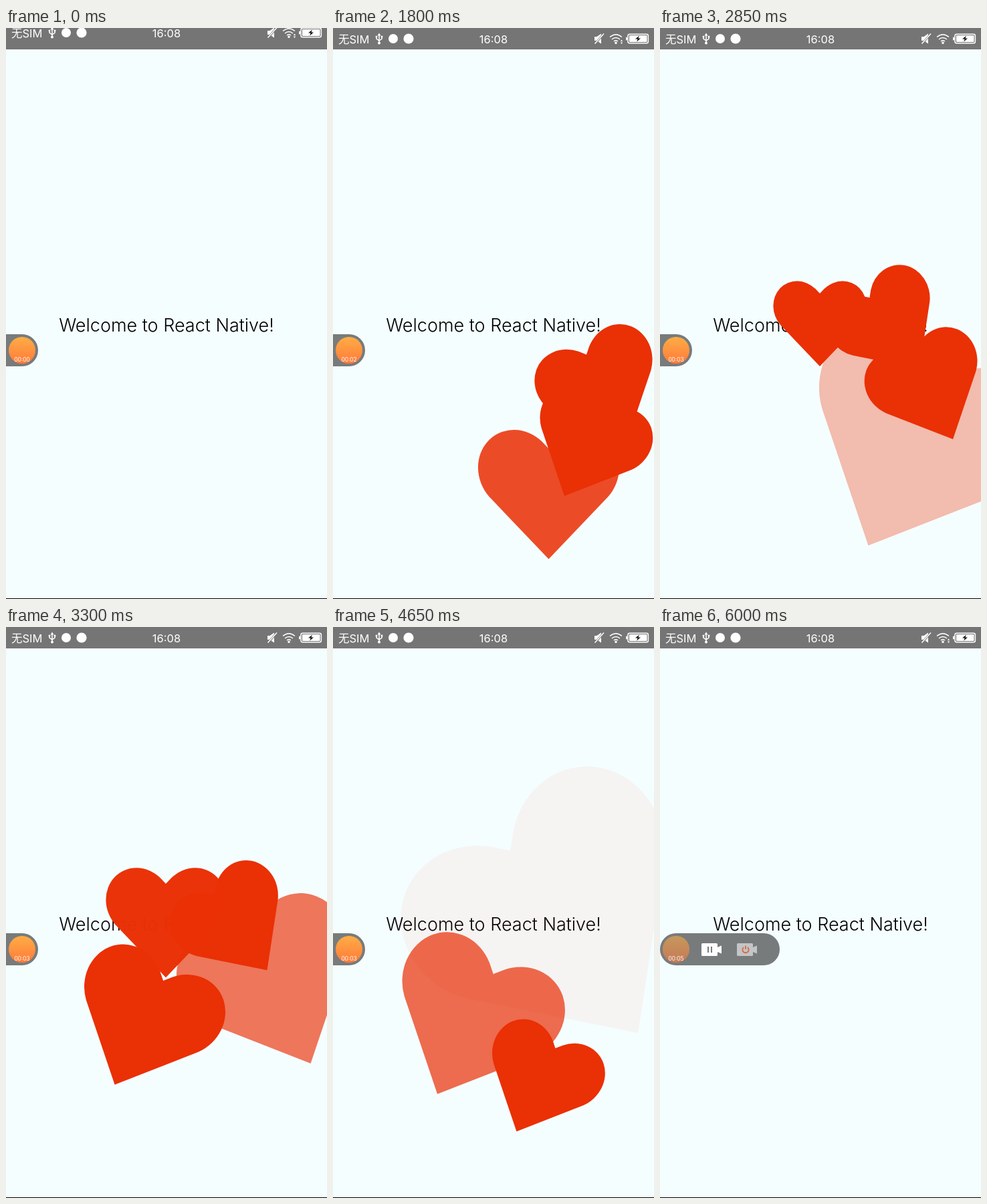
Animation of 480 by 854 pixels, one loop 6150 ms. Source, as an HTML page:

```html
<!DOCTYPE html>
<html lang="en">
<head>
<meta charset="utf-8">
<title>Hearts</title>
<style>
  html, body { margin: 0; width: 100%; height: 100%; overflow: hidden; background: #f5feff; }
  svg { display: block; width: 480px; height: 854px; }
  text { font-family: Inter, "Noto Sans CJK SC", "Noto Sans CJK", sans-serif; }
  .title { font-size: 27px; font-weight: 320; text-anchor: middle; }
  .bar text { font-size: 16.5px; fill: #fff; }
  .clock { font-size: 8.3px; fill: #fff; text-anchor: middle; }
  .line { fill: none; stroke: #fff; stroke-width: 1.5; }
</style>
</head>
<body>
<svg viewBox="0 0 480 854">
  <defs>
    <path id="heart" d="M0 91.8L-88.4 3.3A55.5 60 -45 0 1 -10 -75.1L0 -65.1L10 -75.1A55.5 60 45 0 1 88.4 3.3Z"/>
    <path id="camera" d="M1.5 0H22.5Q24 0 24 1.5V6L30 3.5V15.5L24 13V17.5Q24 19 22.5 19H1.5Q0 19 0 17.5V1.5Q0 0 1.5 0Z"/>
    <linearGradient id="orange" x2="0" y2="1">
      <stop stop-color="#ffad45"/>
      <stop offset="1" stop-color="#ff7a3a"/>
    </linearGradient>
  </defs>

  <rect width="480" height="854" fill="#f5feff"/>
  <text class="title" x="240" y="454">Welcome to React Native!</text>
  <g id="hearts" fill="#ea3005"></g>

  <rect width="480" height="32" fill="#757575"/>
  <g class="bar" id="bar" fill="#fff">
    <text x="8" y="22.5">无SIM</text>
    <text x="240" y="22.5" text-anchor="middle">16:08</text>
    <path class="line" d="M69 10V22M65 13V16L69 19L73 16V13"/>
    <path d="M66.5 11.5L69 7.5L71.5 11.5Z"/>
    <circle cx="69" cy="22.5" r="2"/>
    <circle cx="65" cy="13" r="1.5"/>
    <rect x="71.7" y="11.7" width="2.6" height="2.6"/>
    <circle cx="90" cy="16" r="7"/>
    <circle cx="113" cy="16" r="7.6"/>
    <path d="M391 13H394.5L401 8.5V23.5L394.5 19H391Z"/>
    <path d="M391 24.5L405 8.5" stroke="#757575" stroke-width="3"/>
    <path class="line" d="M391.5 23.5L405 8.5"/>
    <path class="line" d="M414 13.5Q423 6 432 13.5M417 17Q423 12 429 17M420 20Q423 17.5 426 20"/>
    <circle cx="423" cy="22.3" r="1.7"/>
    <path id="wifi" d="M429.8 20L431.5 17.5L433.2 20ZM429.8 21.5H433.2L431.5 24Z"/>
    <rect class="line" x="441" y="9.2" width="30.4" height="13.6" rx="2.5"/>
    <rect x="443" y="11" width="26.5" height="10" rx="1"/>
    <rect x="438" y="13.5" width="2" height="5" rx="1"/>
    <path d="M458 11.5L452 16.6H455.5L454.2 20.5L460 15.4H456.5Z" fill="#111"/>
  </g>

  <path id="panel" fill="#777b7c"/>
  <g id="tools">
    <use href="#camera" x="62" y="473" fill="#fff"/>
    <path d="M72 478V487M77 478V487" stroke="#777b7c" stroke-width="2"/>
    <use id="off" href="#camera" x="115" y="473"/>
    <path d="M125 479.2A4.6 4.6 0 1 0 131 479.2M128 476.8V482" fill="none" stroke="#d9653c" stroke-width="1.7"/>
  </g>
  <circle cx="24" cy="482" r="20" fill="url(#orange)"/>
  <circle id="dim" cx="24" cy="482" r="20" fill="#777b7c"/>
  <text class="clock" id="clock" x="24" y="498.5"></text>
  <rect y="853" width="480" height="1" fill="#000"/>
</svg>

<script>
const LOOP = 6150, STEP = 150, HALF = 400, FADE = 1000;
const $ = id => document.getElementById(id);
const clamp = x => Math.min(1, Math.max(0, x));

// x, y, tilt, born, fade start, removed
const hearts = [
  [322.5, 697.6, 0, 500, 1570, 2570],
  [379.9, 627.2, 25, 1147, 2235, 3235],
  [404.1, 542.3, -25, 1190, 2900, 3900],
  [344.4, 447.5, -35, 2111, 3775, 4775],
  [239, 442.2, 0, 2647, 3240, 3450],
  [205, 593.5, 25, 2900, 4285, 5285],
  [308.4, 681.7, 25, 3490, 5000, 4950]
].map(([x, y, tilt, born, fade, gone]) => {
  const el = document.createElementNS("http://www.w3.org/2000/svg", "use");
  el.setAttribute("href", "#heart");
  $("hearts").append(el);
  return { el, x, y, tilt, born, fade, gone };
});

// Underdamped spring from 0 to 1 with a 25 % overshoot
function spring(ms) {
  if (ms > 950) return 1;
  const n = ms / HALF, a = Math.PI * n;
  return 1 - Math.pow(4, -n) * (Math.cos(a) + 0.441 * Math.sin(a));
}

function easeInOut(x) {
  const half = u => Math.pow(2 * u, 1.68) / 2;
  return x < 0.5 ? half(x) : 1 - half(1 - x);
}

function drawHeart(h, t) {
  const on = t > h.born && t < h.gone;
  h.el.style.display = on ? "" : "none";
  if (!on) return;
  const out = easeInOut(clamp((t - h.fade) / FADE));
  const k = 0.875 * spring(t - h.born) * (1 + 1.5 * out);
  h.el.setAttribute("transform",
    `translate(${h.x} ${h.y}) rotate(${h.tilt}) scale(${k * 0.955} ${k})`);
  h.el.setAttribute("opacity", 1 - out);
}

function drawPanel(t) {
  const open = clamp((t - 5400) / 300), press = clamp((t - 5700) / 300);
  const w = 48 + 131 * open;
  const left = open ? "H24A24 24 0 0 1 24 458Z" : "H0V458Z";
  $("panel").setAttribute("d", `M24 458H${w - 24}A24 24 0 0 1 ${w - 24} 506${left}`);
  $("tools").style.display = open === 1 ? "" : "none";
  $("off").setAttribute("fill", press ? "#c3c5c6" : "#fff");
  $("dim").setAttribute("opacity", 0.42 * press);
  const sec = [750, 1650, 2850, 4800, 5700].filter(s => t >= s).length;
  $("clock").textContent = "00:0" + sec;
}

// The picture advances in fixed steps
function frame(now) {
  const t = Math.floor((now % LOOP) / STEP) * STEP;
  hearts.forEach(h => drawHeart(h, t));
  drawPanel(t);
  $("bar").setAttribute("transform", `translate(0 ${t < STEP ? -9 : 0})`);
  $("wifi").style.display = t >= 2850 && t < 4950 ? "none" : "";
  requestAnimationFrame(frame);
}

frame(0);
</script>
</body>
</html>
```
